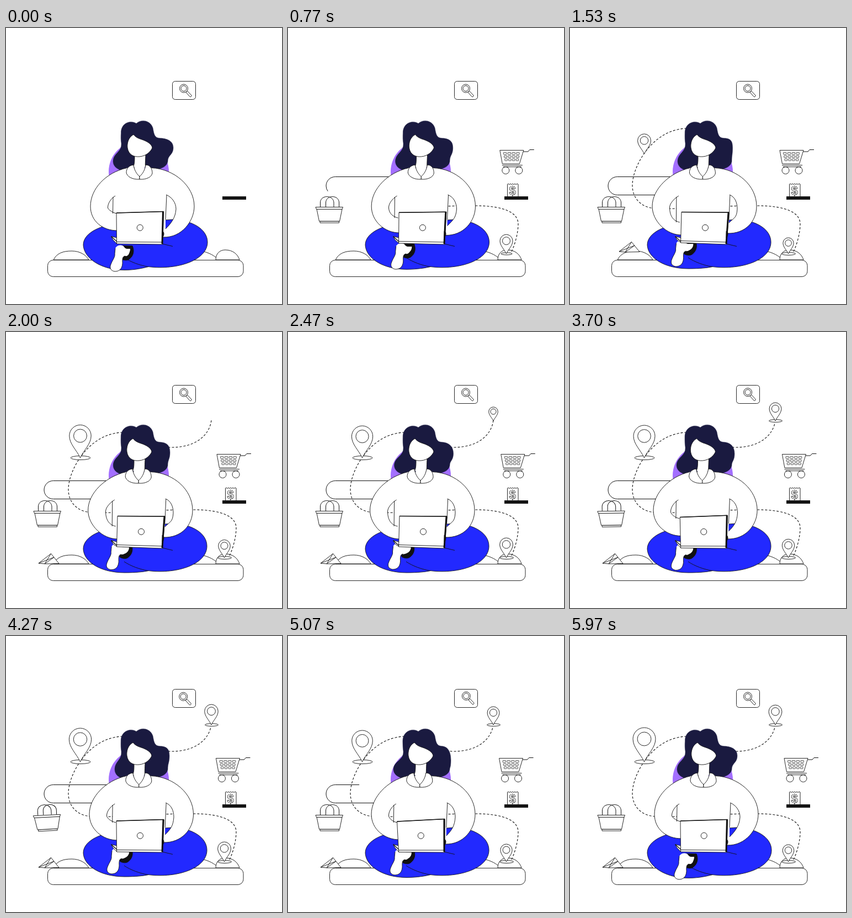
Write an HTML page with a canvas that moves like this. It is 500 by 500 pixels and loops after 6000 ms.

```html
<!DOCTYPE html>
<html lang="en">
<head>
<meta charset="utf-8">
<title>Shopping from home</title>
<style>
  html, body { margin: 0; width: 100%; height: 100%; overflow: hidden; background: #fff; }
  canvas { display: block; width: 500px; height: 500px; }
</style>
</head>
<body>
<canvas id="stage"></canvas>
<script>
const LOOP = 6000;
const INK = '#111', BLUE = '#2229ff', HAIR = '#1a1a40', PURPLE = '#a36fff';
const canvas = document.getElementById('stage');
const dpr = window.devicePixelRatio || 1;
canvas.width = canvas.height = 500 * dpr;
const ctx = canvas.getContext('2d');

const clamp = v => Math.max(0, Math.min(1, v));
const span = (t, from, to) => clamp((t - from) / (to - from));
const smooth = u => u * u * (3 - 2 * u);
const pop = (t, from, to) => 1 - Math.pow(1 - span(t, from, to), 3);

// Smooth track through keys, flat at local extremes
function track(t, times, vals) {
  const n = times.length;
  if (t <= times[0]) return vals[0];
  if (t >= times[n - 1]) return vals[n - 1];
  let i = 0;
  while (t > times[i + 1]) i++;
  const slope = k => (vals[k + 1] - vals[k]) / (times[k + 1] - times[k]);
  const tangent = k => {
    if (k === 0 || k === n - 1) return 0;
    const a = slope(k - 1), b = slope(k);
    return a * b <= 0 ? 0 : 2 * a * b / (a + b);
  };
  const d = times[i + 1] - times[i], u = (t - times[i]) / d;
  const u2 = u * u, u3 = u2 * u;
  return (2 * u3 - 3 * u2 + 1) * vals[i] + (u3 - 2 * u2 + u) * d * tangent(i)
    + (3 * u2 - 2 * u3) * vals[i + 1] + (u3 - u2) * d * tangent(i + 1);
}

const POSE_TIMES = [0, 1530, 2470, 3130, 4270, 5070, 6000];
const POSE = {
  head:   [0, -1, -1, -2, -1, -2],
  chest:  [0, -1.6, -2, -3.5, -1.2, -3.2],
  hairRX: [303, 294.5, 299.5, 299.5, 296, 295],
  hairRY: [217, 217, 220, 224, 217, 225],
  hairLX: [194, 195, 192.5, 189, 197, 191],
  armL:   [153, 149, 148.5, 151, 151, 151],
  armR:   [341, 338, 338, 338.5, 339.5, 339],
  handL:  [367, 375, 375, 369, 370, 369],
  handR:  [379, 372, 372, 376, 374, 377],
  gapL:   [184, 180, 180, 182, 182, 182],
  gapLB:  [336, 352, 352, 338, 338, 338],
  gapR:   [308, 303, 303, 303, 304, 303],
  gapRB:  [364, 353, 353, 362, 360, 362],
  topLX:  [200, 202, 202, 198.5, 200, 197.5],
  topLY:  [335, 333.5, 333.5, 336, 335, 336],
  topRX:  [285.5, 288, 288, 284.5, 286, 284],
  topRY:  [332.5, 334, 334, 332, 332.5, 331.5],
  botLY:  [391, 389, 389, 391.5, 391, 391.5],
  footX:  [0, -5.5, -7.5, -5, -6, -4],
  footY:  [0, -9, -11, -9, -10, -8],
  hem:    [438.5, 436, 436, 436, 436, 437.5],
  knee:   [365, 364, 364, 364, 364, 364],
  lensX:  [0, 0, 0, 1, -0.8, 0.8],
  lensY:  [0, 0, 0, -0.8, 0.2, -0.8]
};

function poseAt(t) {
  const p = {};
  for (const k in POSE) p[k] = track(t, POSE_TIMES, [...POSE[k], POSE[k][0]]);
  return p;
}

function shape(d, fill = '#fff', stroke = INK, width = 0.9, rule = 'nonzero') {
  const path = typeof d === 'string' ? new Path2D(d) : d;
  if (fill) { ctx.fillStyle = fill; ctx.fill(path, rule); }
  if (stroke) { ctx.strokeStyle = stroke; ctx.lineWidth = width; ctx.stroke(path); }
}
const line = (d, width = 0.9) => shape(d, null, INK, width);

function oval(x, y, rx, ry = rx, fill = '#fff', stroke = INK) {
  const path = new Path2D();
  path.ellipse(x, y, rx, ry, 0, 0, 7);
  shape(path, fill, stroke);
}

function box(x, y, w, h, r, width) {
  const path = new Path2D();
  path.roundRect(x, y, w, h, r);
  shape(path, '#fff', INK, width);
}

function at(x, y, draw, scale = 1, angle = 0) {
  if (scale <= 0) return;
  ctx.save();
  ctx.translate(x, y);
  ctx.rotate(angle);
  ctx.scale(scale, scale);
  draw();
  ctx.restore();
}

// Route sampled once so it can be revealed by length
const route = document.createElementNS('http://www.w3.org/2000/svg', 'path');
route.setAttribute('d', 'M405 405C413 388 417 368 417 355C417 332 385 322 340 322'
  + 'C280 321 210 329 155 327C125 325 113 305 113 285C113 250 150 184 210 182'
  + 'C240 182 260 209 300 209C340 209 368 190 372 160');
const routeLen = route.getTotalLength();
const routePts = Array.from({ length: 351 }, (_, i) => route.getPointAtLength(routeLen * i / 350));

function drawRoute(t) {
  const n = Math.floor(350 * span(t, 100, 2000));
  if (!n) return;
  const path = new Path2D();
  for (let i = 0; i <= n; i++) path.lineTo(routePts[i].x, routePts[i].y);
  ctx.setLineDash([4, 3]);
  line(path, 1.1);
  ctx.setLineDash([]);
}

function drawBar(t) {
  const len = 321;
  const a = len * smooth(span(t, 4720, 5720)), b = len * smooth(span(t, 250, 1250));
  if (b - a < 0.5) return;
  ctx.setLineDash([b - a, 2 * len]);
  ctx.lineDashOffset = -a;
  line('M220 269.5H85.5A16.5 16.5 0 0 0 85.5 302.5H220', 1);
  ctx.setLineDash([]);
  ctx.lineDashOffset = 0;
}

function drawGround() {
  shape('M86 420C92 408 103 404 119 404C134 404 145 411 150 420Z');
  line('M330 404C352 400 372 408 382 417');
  shape('M380 420C380 408 388 402 397 402C411 402 420 410 423 420Z');
  box(75.5, 420.5, 354.5, 30, 10);
}

function drawPlane(t) {
  if (t < 900) return;
  const rest = Math.pow(1 - span(t, 900, 2000), 2);
  at(59 + 165 * rest, 419 - 77 * rest, () => {
    shape('M0 0L22.5 -17.5L37 0.5L12 1Z');
    line('M0 0L28 -11L11 1L22.5 -17.5');
  });
}

function drawPin(x, y, h, base) {
  if (h < 1) return;
  if (base > 0) oval(x + 0.5, y, base, base * 0.2);
  const r = h * 0.33, cy = y - h + r;
  shape(`M${x} ${y}C${x - r * 0.35} ${y - r * 0.75} ${x - r} ${cy + r * 0.75} ${x - r} ${cy}`
    + `A${r} ${r} 0 0 1 ${x + r} ${cy}C${x + r} ${cy + r * 0.75} ${x + r * 0.35} ${y - r * 0.75} ${x} ${y}Z`);
  oval(x, cy, h * 0.2);
}

function drawPins(t) {
  drawPin(134.5, 228, track(t, [1250, 1530, 1800, 2470, 3130, 4270, 5070, 6000],
    [0, 36, 60, 58, 57, 61, 57, 62]), 18 * pop(t, 1650, 2100));
  drawPin(395.5, 409, track(t, [300, 700, 1530, 2470, 3130, 4270, 5070, 6000],
    [0, 35, 29, 36, 31.5, 36, 32, 31]), 12.5 * pop(t, 600, 1000));
  drawPin(372, 161, track(t, [2200, 2470, 2750, 3130, 4270, 5070, 6000],
    [0, 25, 35, 29, 37, 33, 36]), 12 * pop(t, 2550, 2950));
}

function drawCard(p) {
  box(301.5, 96.5, 42, 33, 5);
  at(322 + p.lensX, 109.5 + p.lensY, () => {
    shape('M4 7L6.6 4.6L14 12.5C14.5 14.5 12.5 16 11 14.8Z');
    oval(0, 0, 7.5);
    oval(0, 0, 5);
  });
}

function drawBag(t) {
  const swing = -0.05 * Math.sin(Math.PI * span(t, 3400, 5060)) ** 2;
  at(75, 340, () => {
    ctx.translate(-75, -340);
    line('M58.5 324V316C59 302 82 302 83 316V324', 1);
    line('M68.5 324V316C69 302 92 302 92.5 316V324', 1);
    shape('M58 350H92.5V353H58Z');
    shape('M52 328H98L93.5 350H56.5Z');
    shape('M50 324.5H99.5L98 328.3H51.5Z');
  }, pop(t, 80, 560), swing);
}

function drawCart(t) {
  const sway = 4 * (1 + Math.cos(2 * Math.PI * t / 3000));
  at(401 + sway, 243, () => {
    ctx.translate(-401, -243);
    line('M422 224H431L434 220.5H442', 1);
    shape('M380 221.5H423L415.5 246H384.5Z');
    for (let r = 0; r < 3; r++)
      for (let c = 0; c < 4; c++)
        box(386.5 + r * 1.2 + c * (7.8 - r * 0.5), 225.5 + r * 5.7, 5.5 - r * 0.4, 3.5, 0.6, 0.7);
    line('M384 248.5H421M386 251.5H419');
    for (const x of [390.5, 414.5]) {
      oval(x, 258, 6.5, 6.5, null);
      line(`M${x - 4} 251.5H${x + 4}`, 1.2);
    }
  }, pop(t, 60, 540));
}

function drawReceipt(t) {
  const hide = 24 * (1 - pop(t, 150, 900));
  ctx.save();
  ctx.beginPath();
  ctx.rect(390, 275, 50, 31);
  ctx.clip();
  ctx.translate(0, hide);
  let d = 'M397.5 306V283';
  for (let x = 399; x < 417; x += 2) d += `L${x} ${x % 4 === 3 ? 282 : 283.5}`;
  shape(d + 'L417 283V306Z');
  ctx.font = 'bold 22px "Liberation Sans", Arial, sans-serif';
  ctx.textAlign = 'center';
  ctx.lineWidth = 0.7;
  ctx.strokeStyle = INK;
  ctx.strokeText('$', 406.5, 302);
  ctx.restore();
  ctx.fillStyle = '#141414';
  ctx.fillRect(392, 305, 43, 6);
}

function drawHair(p) {
  const { head: h, hairRX: rx, hairRY: ry, hairLX: lx } = p;
  shape(`M${208.5 + h * 0.3} 190C208 172 226 166 236 173C246 164 262 168 266 181`
    + `C268 192 269 199 278 199.5C291 200 ${rx} ${ry - 13} ${rx} ${ry}`
    + `C${rx} ${ry + 13} 293 ${ry + 13} 293 242C290 257 265 259 252 252L232 255`
    + `C220 262 ${lx} 259 ${lx} 241C${lx + 1} 226 210 225 209 209`
    + `C208 203 208 197 ${208.5 + h * 0.3} 190Z`, HAIR, HAIR, 0.5);
}

function drawLegs(p) {
  const { knee: k, hem } = p;
  shape(`M215 354C176 354 140 370 140 393C141 417 172 ${hem} 215 ${hem}C234 ${hem} 250 434.5 258 432.5`
    + `C312 439 ${k} 420 ${k} 388C${k} 364 336 347.5 300 347Z`, BLUE);
  line('M214 416C226 424 242 430 258 432.5M283 391L302 395.5');
}

function drawFoot(p) {
  at(p.footX * 0.3, p.footY, () => {
    shape('M209 394L229 394.5C233 404 231 413 223 419C219 422 212 421 208 418Z', '#111');
    shape('M207 400L225 400C225 409 219 413 207 414Z', '#fff', null);
  });
  at(p.footX, p.footY, () => {
    shape('M198 399C202 392 212 392 215 398C218 401 222 400 224 402C224 409 221 414 216 413'
      + 'C210 414 211 420 211 427C210 437 205 441 197 441C190 440 187 435 190 428'
      + 'C193 420 198 415 197 409Z', '#fff', null);
    line('M216 413C210 414 211 420 211 427C210 437 205 441 197 441C190 440 187 435 190 428'
      + 'C193 420 198 415 197 409L198 399');
  });
}

function drawBody(p) {
  const c = p.chest, { armL: l, armR: r, gapL: gl, gapLB: glb, gapR: gr, gapRB: grb } = p;
  const tl = 194 + c * 0.7, tr = 291 + c * 0.7;
  const lHole = `M${tl + 4} 304C${tl - 4} 309 ${gl} 318 ${gl + 0.5} 326`
    + `C${gl + 1} ${glb - 8} ${tl - 3} ${glb - 2} ${tl + 6} ${glb}`;
  const rHole = `M${tr - 1} 302C${tr + 9} 306 ${gr} 316 ${gr} 328`
    + `C${gr - 1} 344 ${tr + 8} ${grb - 10} ${tr - 2} ${grb}`;
  const leftArm = `M${219 + c} 253.5C180 262 ${l} 292 ${l} 323C${l} 350 175 ${p.handL} 202 ${p.handL}`;
  const rightArm = `C318 ${p.handR + 1} ${r} 350 ${r} 323C${r} 286 304 255 ${264 + c} 253.5`;
  shape(`${leftArm}L205 378H284L285 ${p.handR}${rightArm}Z`
    + `${lHole}L${tl} 330V306Z${rHole}L${tr - 2} 335L${tr} 303Z`, '#fff', null, 0, 'evenodd');
  line(`${leftArm}M285 ${p.handR}${rightArm}${lHole}${rHole}`
    + `M${tl} 306L${tl - 0.5} ${glb}M${tr} 303L${tr - 2} 347`);
}

function drawHead(p) {
  at(p.head, 0, () => {
    shape('M233 226C233 240 233 246 231 250L241.5 269L252.5 250C252 245 253 238 253 224Z', '#fff', null);
    line('M233 226C233 240 233 246 231 250M252.5 250C252 245 253 238 253 224');
  });
  at(p.chest, 0, () => {
    shape('M231 248C222 249 218 255 218 262C219 269 229 275 242 274V269C236 264 232 256 231 248Z');
    shape('M253 248C262 248 265 256 265 263C264 270 254 275 242 274V269C248 264 252 256 253 248Z');
  });
  at(p.head, 0, () => {
    shape('M231 193C222 198 219 208 220 217C222 230 232 234 242 233C254 232 262 224 265 217'
      + 'C264 210 255 205 246 202C239 200 234 197 231 193Z');
  });
}

function drawLaptop(p) {
  const { topLX: ax, topLY: ay, topRX: bx, topRY: by, botLY: cy } = p;
  shape(`M190.5 377.5L201 380V${cy}L194 384Z`);
  line('M191 378L201 387', 1.3);
  shape(`M${ax} ${ay}L${bx} ${by}L283.5 392L200.5 ${cy}Z`);
  line(`M200.5 ${cy - 3.5}L283 388`);
  line(`M${ax} ${ay}L${bx} ${by}`, 1.6);
  line(`M${bx - 1} ${by}L283 391`, 3);
  shape('M283 368C287 369 287 376 283 380Z', '#111');
  oval((ax + bx) / 2, (ay + by) / 2 + 28, 5.5);
}

function frame(now) {
  const t = now % LOOP, p = poseAt(t);
  ctx.setTransform(dpr, 0, 0, dpr, 0, 0);
  ctx.fillStyle = '#fff';
  ctx.fillRect(0, 0, 500, 500);
  ctx.lineJoin = 'round';

  drawBar(t);
  drawGround();
  drawRoute(t);
  drawPlane(t);
  drawPins(t);
  drawCard(p);
  drawBag(t);
  drawCart(t);
  drawReceipt(t);

  oval(240.5, 260, 54.5, 54.5, PURPLE, null);
  drawHair(p);
  drawLegs(p);
  drawFoot(p);
  drawBody(p);
  drawHead(p);
  drawLaptop(p);
}

const start = performance.now();
function tick() {
  frame(performance.now() - start);
  requestAnimationFrame(tick);
}
tick();
</script>
</body>
</html>
```
